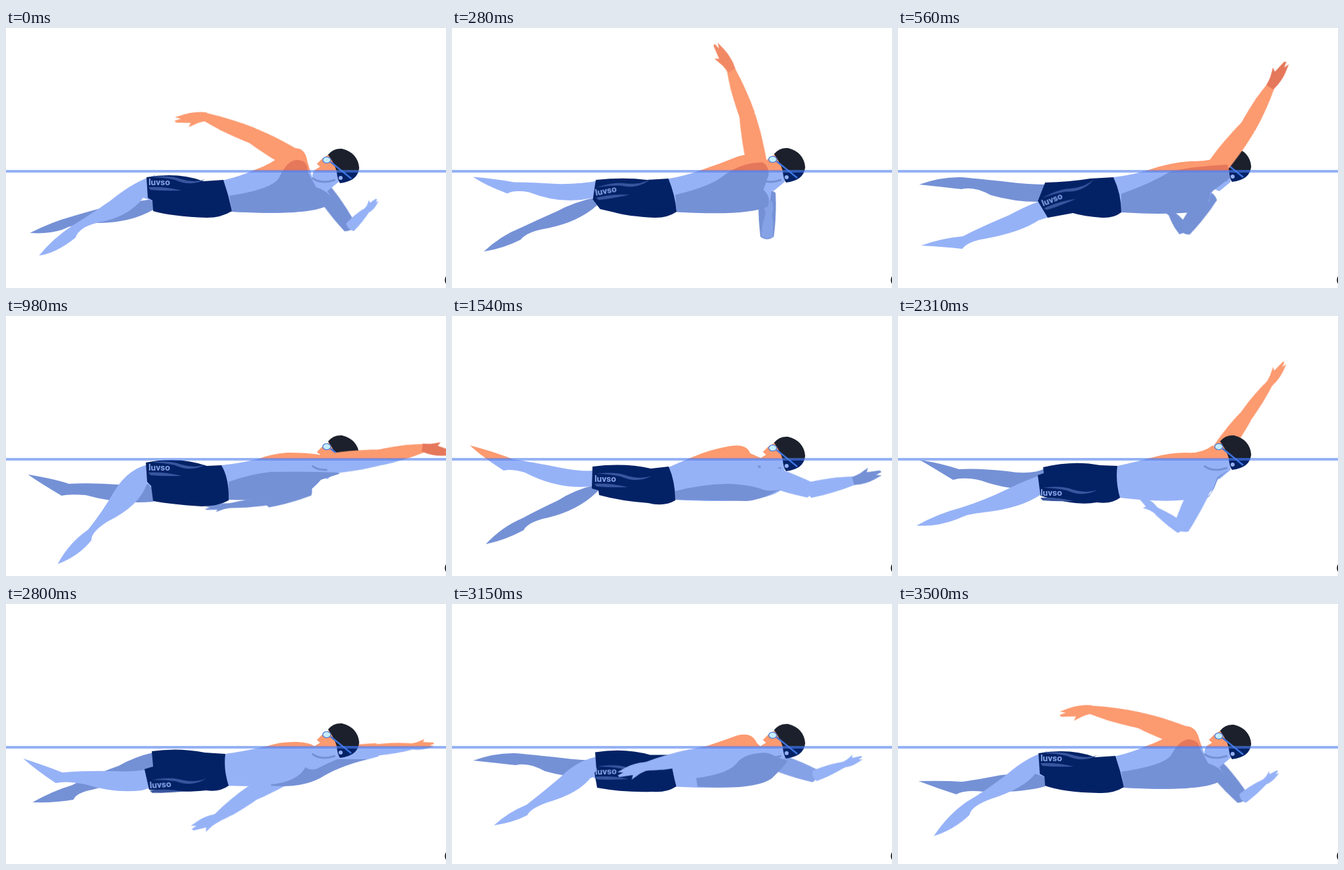
Animation of 664x392 px, one loop 3570 ms. Source, as an HTML page without scripts:

```html
<!DOCTYPE html>
<html lang="en">
<head>
<meta charset="utf-8">
<title>Backstroke</title>
<style>
html, body { margin: 0; width: 100%; height: 100%; overflow: hidden; background: #fff; }
svg { display: block; width: 664px; height: 392px; --light: #fc9a70; --dark: #e5775a; }
.move { animation: 3.57s linear infinite; }
.light { fill: var(--light); }
.dark { fill: var(--dark); }

/* each segment advances in 70 ms steps */
#near-leg {
  animation-name: near-leg;
  --up: path("M222 232Q200 236 165 229Q120 220 92 216Q65 205 27 195Q45 212 78 233Q90 230 110 236Q160 262 210 257L222 250Z");
  --down: path("M225 222Q186 226 163 265Q145 296 124 322Q95 342 78 374Q110 362 129 338Q128 326 153 310Q202 286 213 252L222 262Z");
}
@keyframes near-leg {
  0%, 100% { animation-timing-function: steps(5); d: path("M225 222Q195 230 158 260Q125 283 100 298Q70 318 50 343Q75 340 105 316Q110 300 140 293Q185 285 207 256L225 262Z"); }
  9.8% { animation-timing-function: steps(3); d: var(--up); }
  15.68% { animation-timing-function: steps(6); d: path("M226 258Q205 262 168 282Q125 300 98 314Q65 317 35 328Q70 330 97 333Q105 322 130 318Q185 308 212 290L228 285Z"); }
  27.45% { animation-timing-function: steps(8); d: var(--down); }
  43.13% { animation-timing-function: steps(8); d: var(--up); }
  58.82% { animation-timing-function: steps(3); d: var(--down); }
  64.7% { animation-timing-function: steps(5); d: path("M222 238Q195 246 163 262Q130 278 95 289Q60 298 28 316Q60 318 90 306Q105 298 130 296Q185 290 216 269L222 262Z"); }
  74.5% { animation-timing-function: steps(2); d: var(--up); }
  78.43% { animation-timing-function: steps(7); d: path("M222 247Q200 254 165 252Q120 251 85 254Q60 244 26 233Q45 250 75 270Q90 266 120 272Q165 286 205 281L222 276Z"); }
  92.15% { animation-timing-function: steps(3); d: var(--down); }
  98.03% { animation-timing-function: steps(1); d: path("M225 222Q195 230 163 258Q130 283 104 298Q75 318 54 350Q85 340 108 318Q110 305 140 294Q190 278 207 256L225 262Z"); }
}
#far-leg {
  animation-name: far-leg;
  --up: path("M228 236Q195 236 165 232Q120 227 96 225Q65 224 32 236Q70 240 96 243Q115 238 140 252Q175 262 210 262L228 252Z");
  --down: path("M215 255Q185 262 160 278Q130 292 106 305Q75 318 51 344Q80 338 108 323Q115 310 145 304Q190 293 218 266L222 262Z");
}
@keyframes far-leg {
  0%, 100% { animation-timing-function: steps(5); d: path("M222 258Q190 262 150 270Q130 275 100 284Q70 292 36 309Q65 311 85 304Q110 292 140 294Q190 293 222 274L225 262Z"); }
  9.8% { animation-timing-function: steps(3); d: var(--down); }
  15.68% { animation-timing-function: steps(6); d: var(--up); }
  27.45% { animation-timing-function: steps(8); d: path("M222 252Q200 255 165 254Q125 251 95 253Q75 246 33 239Q55 254 84 271Q95 268 120 270Q170 284 222 280L225 265Z"); }
  43.13% { animation-timing-function: steps(3); d: var(--down); }
  49.01% { animation-timing-function: steps(8); d: var(--up); }
  64.7% { animation-timing-function: steps(4); d: path("M222 230Q200 240 165 234Q120 229 92 231Q65 222 33 217Q55 230 83 247Q100 242 125 248Q165 262 195 260L222 242Z"); }
  72.54% { animation-timing-function: steps(3); d: path("M220 232Q195 238 175 264Q150 295 122 322Q95 340 79 374Q110 360 128 338Q128 325 150 308Q195 285 212 258L222 262Z"); }
  78.43% { animation-timing-function: steps(5); d: path("M222 224Q195 230 170 244Q120 262 100 273Q70 282 40 299Q75 300 102 295Q105 285 130 280Q190 265 222 245L225 240Z"); }
  88.23% { animation-timing-function: steps(5); d: var(--up); }
  98.03% { animation-timing-function: steps(1); d: path("M222 256Q190 254 155 258Q125 264 97 268Q70 266 31 267Q60 278 88 287Q100 280 130 283Q185 285 222 275L225 262Z"); }
}

#torso { animation-name: torso; }
@keyframes torso {
  0%, 100% { animation-timing-function: steps(8); d: path("M310 232L330 229Q352 224 375 214Q400 206 424 186Q450 172 455 202L462 225Q495 250 490 262Q470 284 341 277L310 278Z"); }
  15.68% { animation-timing-function: steps(6); d: path("M310 230L325 225Q352 222 378 214Q410 203 440 201Q465 201 478 197L500 222Q472 240 470 260Q458 286 337 277L310 278Z"); }
  27.45% { animation-timing-function: steps(8); d: path("M310 230L325 225Q355 222 382 215Q400 208 425 206Q455 206 472 209L505 236Q488 237 475 247Q450 280 336 277L310 278Z"); }
  43.13% { animation-timing-function: steps(11); d: path("M310 232L327 228Q345 220 362 213Q390 201 420 196Q445 192 450 207L466 214Q500 235 497 262Q470 285 337 277L310 278Z"); }
  64.7% { animation-timing-function: steps(7); d: path("M310 230L331 226Q355 221 385 213Q410 206 435 206Q458 208 475 195L498 232Q480 245 477 260Q455 288 335 274L310 276Z"); }
  78.43% { animation-timing-function: steps(10); d: path("M310 230L331 226Q360 222 395 214Q415 207 440 208Q458 209 465 214L498 232Q478 250 470 262Q430 278 336 274L310 276Z"); }
  98.03% { animation-timing-function: steps(1); d: path("M310 232L330 229Q352 224 375 214Q400 206 422 188Q448 176 455 205L462 225Q495 250 490 262Q470 284 341 277L310 278Z"); }
}
#shade { animation-name: shade; }
@keyframes shade {
  0%, 100% { animation-timing-function: steps(8); d: path("M337 253Q402 243 412 226Q425 198 440 199Q456 200 455 216L468 240Q496 250 490 264Q470 284 341 277Z"); }
  15.68% { animation-timing-function: steps(6); d: path("M337 250Q380 235 412 216Q450 208 497 206Q500 215 501 226L472 248Q470 262 462 275Q420 283 337 278Z"); }
  27.45% { animation-timing-function: steps(8); d: path("M336 250Q370 238 400 235Q450 234 500 236Q504 237 503 238L475 247Q462 263 448 269Q415 279 336 277Z"); }
  43.13% { animation-timing-function: steps(11); d: path("M337 264Q375 254 415 253Q450 254 470 262Q485 266 497 260L482 268Q465 277 445 279Q400 278 337 277Z"); }
  64.7% { animation-timing-function: steps(7); d: path("M466 274Q473 268 477 257Q480 248 482 243Q490 238 499 232L482 246Q478 260 472 268Q469 274 466 274Z"); }
  78.43% { animation-timing-function: steps(10); d: path("M400 272Q440 268 452 246Q460 252 470 248Q485 240 500 234L545 234Q500 246 475 262Q445 278 400 274Z"); }
  98.03% { animation-timing-function: steps(1); d: path("M337 253Q402 243 412 228Q425 204 440 204Q454 206 455 216L468 240Q496 250 490 264Q470 284 341 277Z"); }
}
#shorts { animation-name: shorts; fill: #032266; }
@keyframes shorts {
  0%, 100% { animation-timing-function: steps(8); d: path("M212 225Q260 217 298 231L328 229Q336 252 341 276Q325 286 303 286Q250 284 222 276L221 260L214 256Z"); }
  15.68% { animation-timing-function: steps(6); d: path("M222 233Q260 232 290 227L325 225Q337 250 337 278Q325 287 308 286Q280 284 264 279L226 286L211 261Z"); }
  27.45% { animation-timing-function: steps(8); d: path("M211 221Q260 211 303 226L325 225Q337 245 336 278Q320 287 295 287Q250 284 222 279L219 256L213 250Z"); }
  43.13% { animation-timing-function: steps(11); d: path("M212 227Q260 221 300 230L327 227Q337 250 337 278Q320 288 296 282Q255 279 222 270L221 263L211 260Z"); }
  64.7% { animation-timing-function: steps(7); d: path("M219 228Q265 217 305 225L331 226Q328 250 335 274Q322 284 300 281Q270 287 215 271L211 240L220 237Z"); }
  78.43% { animation-timing-function: steps(10); d: path("M220 222Q260 216 300 224L331 226Q328 250 336 274Q322 284 302 281Q270 285 216 280L209 249L222 245Z"); }
  98.03% { animation-timing-function: steps(1); d: path("M212 225Q260 217 298 231L328 229Q336 252 341 276Q325 286 303 285Q250 284 222 274L221 260L214 256Z"); }
}
#label { animation-name: label; }
#label text { font: 700 13.5px Roboto, sans-serif; fill: #8aa6ec; }
#label path { fill: #38569f; }
@keyframes label {
  0%, 98.03%, 100% { animation-timing-function: steps(8); transform: translate(215px, 237px) rotate(0deg); }
  15.68% { animation-timing-function: steps(6); transform: translate(219px, 269px) rotate(-22deg); }
  27.45% { animation-timing-function: steps(8); transform: translate(215px, 233px) rotate(0deg); }
  43.13% { animation-timing-function: steps(11); transform: translate(215px, 250px) rotate(0deg); }
  64.7% { animation-timing-function: steps(7); transform: translate(215px, 271px) rotate(0deg); }
  78.43% { animation-timing-function: steps(10); transform: translate(217px, 278px) rotate(-4deg); }
}

/* arm bones: shoulder, elbow, wrist */
#near-arm { animation-name: near-arm; }
@keyframes near-arm {
  0% { animation-timing-function: steps(8); transform: translate(435px, 198px) rotate(209.6deg); }
  15.68% { animation-timing-function: steps(6); transform: translate(484px, 206px) rotate(308deg); }
  27.45% { animation-timing-function: steps(8); transform: translate(493px, 222px) rotate(353deg); }
  43.13% { animation-timing-function: steps(3); transform: translate(472px, 239px) rotate(379deg); }
  49.01% { animation-timing-function: steps(8); transform: translate(473px, 242px) rotate(411deg); }
  64.7% { animation-timing-function: steps(7); transform: translate(459px, 255px) rotate(476deg); }
  78.43% { animation-timing-function: steps(10); transform: translate(434px, 249px) rotate(510deg); }
  98.03% { animation-timing-function: steps(1); transform: translate(433px, 200px) rotate(560deg); }
  100% { transform: translate(435px, 198px) rotate(569.6deg); }
}
#near-fore { animation-name: near-fore; }
@keyframes near-fore {
  0% { animation-timing-function: steps(8); transform: rotate(-8deg) scale(1, 1); }
  15.68% { animation-timing-function: steps(6); transform: rotate(-9deg) scale(.92, 1); }
  27.45% { animation-timing-function: steps(8); transform: rotate(-5deg) scale(.88, 1); }
  43.13% { animation-timing-function: steps(3); transform: rotate(-31deg) scale(.9, 1); }
  49.01% { animation-timing-function: steps(8); transform: rotate(-90deg) scale(.65, 1); }
  64.7% { animation-timing-function: steps(7); transform: rotate(-261deg) scale(.62, .75); }
  78.43% { animation-timing-function: steps(10); transform: rotate(-365deg) scale(.86, 1); }
  98.03%, 100% { animation-timing-function: steps(1); transform: rotate(-368deg) scale(1, 1); }
}
#near-hand { animation-name: near-hand; }
@keyframes near-hand {
  0%, 100% { animation-timing-function: steps(8); transform: rotate(-28deg); fill: var(--light); }
  15.68% { animation-timing-function: steps(6); transform: rotate(5deg); fill: var(--dark); }
  27.45% { animation-timing-function: steps(8); transform: rotate(20deg); fill: var(--dark); }
  43.13% { animation-timing-function: steps(11); transform: rotate(-4deg); fill: var(--dark); }
  64.7% { animation-timing-function: steps(7); transform: rotate(4deg); fill: var(--light); }
  78.43% { animation-timing-function: steps(10); transform: rotate(11deg); fill: var(--light); }
  98.03% { animation-timing-function: steps(1); transform: rotate(-21deg); fill: var(--light); }
}
#far-arm { animation-name: far-arm; }
@keyframes far-arm {
  0% { animation-timing-function: steps(8); transform: translate(483px, 251px) rotate(54deg); fill: var(--dark); }
  15.68% { animation-timing-function: steps(6); transform: translate(468px, 256px) rotate(126deg); fill: var(--dark); }
  27.45% { animation-timing-function: steps(8); transform: translate(452px, 260px) rotate(162deg); fill: var(--dark); }
  43.13% { animation-timing-function: steps(11); transform: translate(430px, 248px) rotate(185deg); fill: var(--light); }
  64.7% { animation-timing-function: steps(7); transform: translate(488px, 202px) rotate(306deg); fill: var(--light); }
  78.43% { animation-timing-function: steps(10); transform: translate(500px, 230px) rotate(350.5deg); fill: var(--light); }
  98.03% { animation-timing-function: steps(1); transform: translate(480px, 247px) rotate(409deg); fill: var(--dark); }
  100% { transform: translate(483px, 251px) rotate(414deg); fill: var(--dark); }
}
#far-fore { animation-name: far-fore; }
@keyframes far-fore {
  0% { animation-timing-function: steps(8); transform: rotate(-99deg) scale(.56, .8); fill: var(--light); }
  15.68% { animation-timing-function: steps(6); transform: rotate(-253deg) scale(.5, .9); fill: var(--dark); }
  27.45% { animation-timing-function: steps(8); transform: rotate(-349deg) scale(.89, .65); fill: var(--dark); }
  43.13% { animation-timing-function: steps(11); transform: rotate(-360deg) scale(.9, .8); fill: var(--light); }
  64.7% { animation-timing-function: steps(7); transform: rotate(-360deg) scale(.97, .95); fill: var(--light); }
  78.43% { animation-timing-function: steps(10); transform: rotate(-356deg) scale(.82, .85); fill: var(--light); }
  98.03% { animation-timing-function: steps(1); transform: rotate(-446deg) scale(.64, .8); fill: var(--light); }
  100% { transform: rotate(-459deg) scale(.56, .8); fill: var(--light); }
}
#head { animation-name: head; }
@keyframes head {
  0%, 43.13%, 98.03%, 100% { animation-timing-function: steps(8); transform: translateY(0); }
  15.68%, 27.45%, 64.7%, 78.43% { animation-timing-function: steps(7); transform: translateY(-2px); }
}
</style>
</head>
<body>
<svg viewBox="0 0 664 392">
  <defs>
    <!-- below the surface, warm skin tones turn blue -->
    <filter id="water" filterUnits="userSpaceOnUse" x="0" y="0" width="664" height="392" color-interpolation-filters="sRGB">
      <feOffset in="SourceGraphic" x="0" y="0" width="664" height="216" result="dry"/>
      <feColorMatrix in="SourceGraphic" x="0" y="216" width="664" height="176" result="wet"
        values="1.435 0 0 0 -.83  0 .943 0 0 .129  0 0 1.5 0 .31  0 0 0 1 0"/>
      <feMerge><feMergeNode in="dry"/><feMergeNode in="wet"/></feMerge>
    </filter>
    <linearGradient id="cap" gradientUnits="userSpaceOnUse" x1="0" y1="215" x2="0" y2="217">
      <stop offset=".5" stop-color="#1b202c"/><stop offset=".5" stop-color="#032266"/>
    </linearGradient>
    <path id="upper" d="M-6-15Q30-17 72-12Q81 0 72 12Q30 17-6 15Q-16 0-6-15Z"/>
    <path id="fore" d="M0-12Q40-13 79-6L79 6Q40 12 0 12Q-10 0 0-12Z"/>
    <path id="hand" d="M-4-6L10-8L26-13L22-7L44-4L46-1L36 1L45 4L30 7Q12 10-4 6Z"/>
  </defs>

  <g filter="url(#water)">
    <path id="far-leg" class="move dark"/>
    <g id="far-arm" class="move">
      <g transform="scale(.85)">
        <use href="#upper"/>
        <g transform="translate(72)">
          <g id="far-fore" class="move"><use href="#fore"/><use href="#hand" x="78"/></g>
        </g>
      </g>
    </g>
    <path id="near-leg" class="move light"/>
    <path id="torso" class="move light"/>
    <path class="light" d="M488 190L476 198L469 205L474 209L466 214Q460 222 464 228L470 240L485 246L502 232L500 200Z"/>
    <path d="M462 226Q475 236 497 229" fill="none" stroke="#e5775a" stroke-width="3"/>
  </g>

  <path id="shorts" class="move"/>
  <g id="label" class="move">
    <path d="M4-12Q30-16 50-9Q70-3 86-9Q64 3 40-8Q22-12 4-12ZM0 3Q25 2 50 8Q25 9 3 7Z"/>
    <text>luvso</text>
  </g>

  <g id="head" class="move">
    <path fill="url(#cap)" d="M486 191Q494 181 507 182Q531 188 533 211Q531 231 504 234Q500 228 499 216Q495 203 486 191Z"/>
    <path d="M490 202L521 227" stroke="#3d73dd" stroke-width="2.500"/>
    <ellipse cx="484" cy="199" rx="6" ry="4.500" fill="#c4edfb" stroke="#3d73dd" stroke-width="1.200"/>
    <circle cx="505" cy="226" r="3" fill="#96b2f7"/>
  </g>

  <g filter="url(#water)">
    <g id="near-arm" class="move light">
      <use href="#upper"/>
      <g transform="translate(72)">
        <g id="near-fore" class="move">
          <use href="#fore"/>
          <g transform="translate(78)"><g id="near-hand" class="move"><use href="#hand"/></g></g>
        </g>
      </g>
    </g>
    <path id="shade" class="move dark"/>
  </g>

  <rect y="214" width="664" height="4" fill="#4f7fee" opacity=".6"/>
  <circle cx="672" cy="380" r="9" fill="none" stroke="#000" stroke-width="1.500"/>
</svg>
</body>
</html>
```
